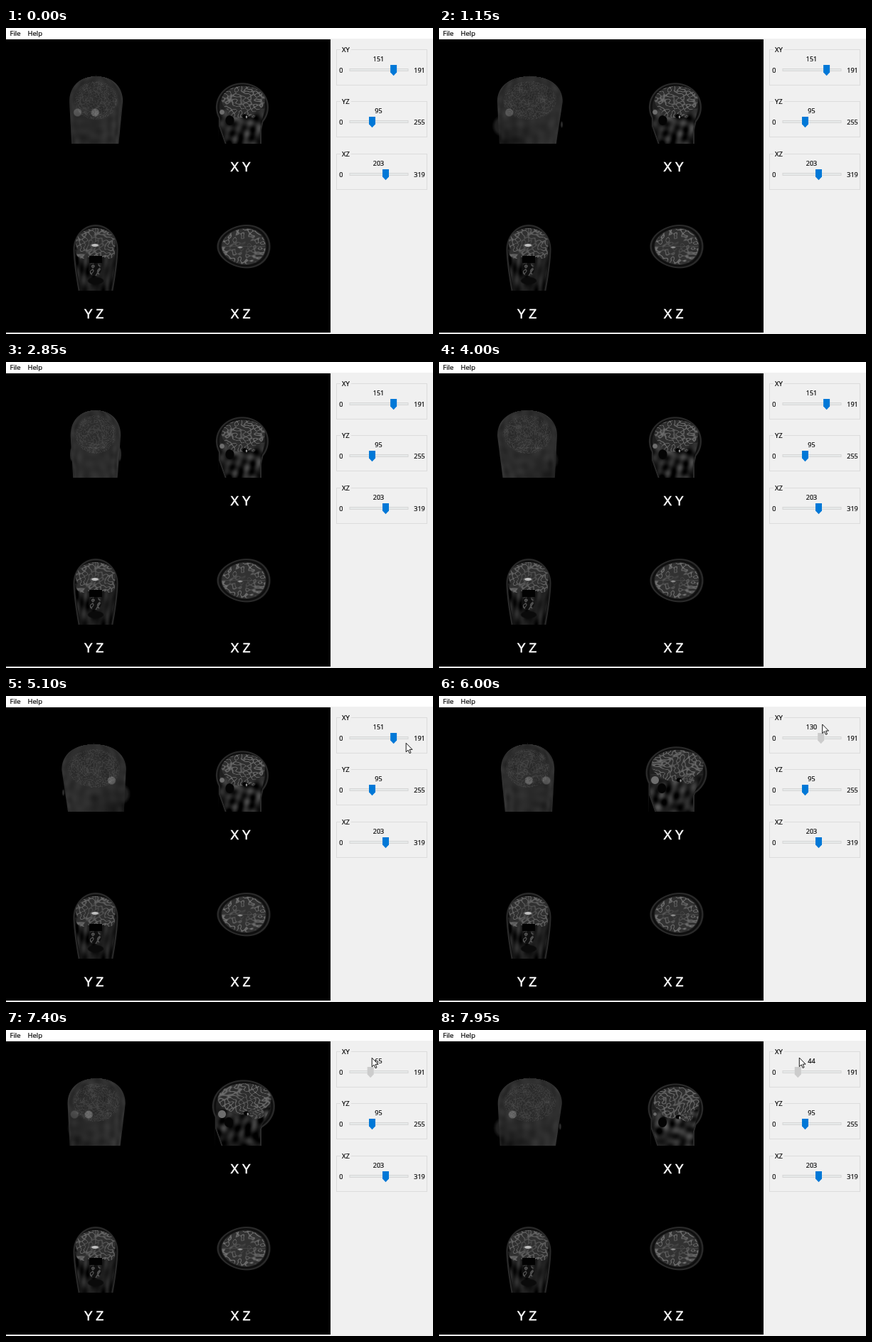
Recreate the animation shown at these times as an HTML page with a canvas. Size 600 by 431 pixels, loop 8000 ms.

```html
<!DOCTYPE html>
<html lang="en">
<head>
<meta charset="utf-8">
<title>Slice viewer</title>
<style>
  html, body { margin: 0; width: 100%; height: 100%; overflow: hidden; background: #f0f0f0; }
  canvas, svg { position: absolute; left: 0; top: 0; display: block; }
  text { font-family: "Open Sans", "Noto Sans", sans-serif; font-size: 9px; fill: #000; stroke: #000; stroke-width: .2px; }
  .menu, .title { font-size: 9.5px; }
  .mid { text-anchor: middle; }
  .view { font: 18px "Liberation Sans", Arial, sans-serif; fill: #fff; stroke: #fff; stroke-width: .5px; text-anchor: middle; }
</style>
</head>
<body>
<canvas width="456" height="429"></canvas>
<svg width="600" height="431" viewBox="0 0 600 431">
  <rect width="600" height="16" fill="#f0f0f0"/>
  <rect width="600" height="15" fill="#fff"/>
  <text class="menu" x="5.5" y="11.3">File</text>
  <text class="menu" x="30.5" y="11.3">Help</text>
  <text class="view" x="329.5" y="202">X Y</text>
  <text class="view" x="123.5" y="409">Y Z</text>
  <text class="view" x="329.5" y="409">X Z</text>
  <g id="panel"></g>
  <path id="cursor" d="M0 0V12.6L2.9 9.8 4.9 14.4 6.8 13.6 4.9 9.1H8.8Z" fill="#fff" stroke="#000" stroke-width=".9"/>
</svg>
<script>
const LOOP = 8000, STEP = 50;
const ctx = document.querySelector('canvas').getContext('2d');
const panel = document.getElementById('panel');
const cursor = document.getElementById('cursor');

const clamp = (v, lo = 0, hi = 1) => Math.min(hi, Math.max(lo, v));
const mix = (a, b, k) => a + (b - a) * clamp(k);
const lay = (under, over, d) => mix(under, over, d + 0.5);
const oval = (x, y, cx, cy, rx, ry) =>
  (1 - Math.hypot((x - cx) / rx, (y - cy) / ry)) * Math.min(rx, ry);

function track(keys, t) {
  let i = 1;
  while (i < keys.length - 1 && t > keys[i][0]) i++;
  const [t0, a] = keys[i - 1], [t1, b] = keys[i];
  return mix(a, b, (t - t0) / (t1 - t0));
}

// Random field of plane waves; its zero lines look like cortical folds.
let seed = 11;
const random = () => (seed = (seed * 16807) % 2147483647) / 2147483647;
const waves = Array.from({ length: 14 }, () => {
  const z = random() * 2 - 1, turn = random() * 2 * Math.PI;
  const k = 2 * Math.PI / (8.5 + random() * 3), r = Math.sqrt(1 - z * z) * k;
  return [r * Math.cos(turn), r * Math.sin(turn), z * k, random() * 6.28];
});
const field = (x, y, z) =>
  waves.reduce((sum, w) => sum + Math.cos(w[0] * x + w[1] * y + w[2] * z + w[3]), 0) / 2.65;
const folds = (x, y, z) =>
  Math.max(0, 1 - Math.abs(field(x * 1.3, y * 1.3, z * 1.3)) * 1.25);

function paint(x0, y0, w, h, shade) {
  const image = ctx.createImageData(w, h);
  for (let i = 0; i < w * h; i++) {
    const g = shade(x0 + i % w + 0.5, y0 + Math.floor(i / w) + 0.5);
    image.data.set([g, g, g, 255], i * 4);
  }
  ctx.putImageData(image, x0, y0);
}

// Scalp, bone and the space under it, by depth below the skin.
const shell = d => lay(lay(lay(0, 42, d), 15, d - 2), 30, d - 4.5);

function coronal(x, y) {
  const cx = 126, side = Math.abs(x - cx), low = clamp((y - 312) / 57);
  const d = y < 312 ? oval(x, y, cx, 312, 31.5, 35) : 31.5 - 7 * low ** 1.5 - side;
  let v = shell(d);
  if (y > 312) v = lay(v, 27 + 12 * field(x * 1.2, y * 0.35, 9) - 12 * low, d - 3);
  const brain = Math.max(oval(x, y, cx, 303, 28, 21), oval(side, y, 18, 317, 9, 8));
  v = lay(v, 48 + 60 * folds(x, y, 4) * clamp(1.2 - brain / 22), brain);
  if (y < 301) v = lay(v, 100, Math.min(brain, 0.4 - side));
  v = lay(v, 190, oval(x, y, 125, 306, 5, 2));
  v = lay(v, 2, Math.min(9 - side, 5 - Math.abs(y - 326)));
  v = lay(v, 15 + 80 * folds(x, y, 22), oval(x, y, 125, 340, 9, 9));
  return lay(v, 10, oval(x, y, cx, 356, 11, 5));
}

function axial(x, y) {
  const dx = x - 334, dy = (y - 307.7) / (1 + 0.003 * dx);
  const d = oval(dx, dy, 0, 0, 37.5, 30.5);
  let v = shell(d);
  const brain = d - 5.5;
  v = lay(v, 50 + 68 * folds(x, y, 40) * clamp(1.25 - brain / 20), brain);
  v = lay(v, 85, Math.min(brain - 1, 0.2 - Math.abs(dy)));
  return lay(v, 140, oval(x, y, 329, 309, 4, 1.6) - 0.3);
}

function sagittal(value) {
  const s = Math.sqrt(1 - ((value - 95) / 92.5) ** 2), tall = s ** 0.45;
  const cx = 322 + 12.5 * s, rx = 46.5 * s, top = 163 - 95 * tall, cy = top + 38 * tall;
  const middle = clamp((s - 0.95) / 0.045), depth = value * 0.35;
  const eyeAt = value > 95 ? 132 : 66;
  const eye = 5.5 * Math.sqrt(Math.max(0, 1 - ((value - eyeAt) / 24) ** 2));
  const lobeSize = clamp(1.6 - Math.abs(value - 85) / 50, 0.1);
  return (x, y) => {
    const left = cx - rx + 4 + Math.max(0, y - 138) * 0.35;
    const right = mix(cx + rx - 3, 359, (y - cy) / 32);
    const skull = oval(x, y, cx, cy, rx, 38 * tall);
    const body = Math.min(x - left, right - x, y - cy);
    const nose = oval(x, y, cx - rx + 4, 130, 6 * middle + 0.1, 7);
    let v = shell(Math.max(skull, body, nose));
    if (y > cy) v = lay(v, 34 + 16 * field(x * 0.8, y * 0.6, depth) - (y - cy) * 0.2, body - 2);
    v = lay(v, 4, oval(x, y, cx - 22 * s, 130, 6 + 4 * middle, 7));
    const bands = 20 + 45 * Math.max(0, Math.sin(y * 0.85 + x * 0.08));
    v = lay(v, mix(v, bands, middle), oval(x, y, cx - 23, 132, 17, 11));

    const brain = Math.max(oval(x, y, cx + 1.5, top + 27 * tall, rx - 6.5, 22 * tall),
      oval(x, y, cx - 2, top + 42, 17 * (1 - middle) + 0.1, 7));
    v = lay(v, 46 + 66 * folds(x, y, depth) * clamp(1.35 - brain / 28), brain);
    const lobe = oval(x, y, cx + 19 * s, top + 47, 11 * lobeSize, 8 * lobeSize);
    v = lay(v, 50 + 45 * folds(x * 1.4, y * 1.4, depth), lobe);

    const arch = oval(x, y, cx - 3, top + 38, 19, 14);
    if (y < top + 39) {
      v = lay(v, mix(v, 115, middle), 1 - Math.abs(arch));
      v = lay(v, mix(v, 45, middle), 1.5 - Math.abs(arch - 3));
      v = lay(v, mix(v, 115, middle), 1 - Math.abs(arch - 6));
    }
    v = lay(v, mix(v, 75, middle), oval(x, y, cx + 2, top + 53, 5, 13));
    v = lay(v, mix(v, 130, middle), oval(x, y, cx + 8, top + 52, 1.5, 9));
    v = lay(v, mix(2, v, middle), oval(x, y, cx + 4, top + 47, 4, 3));
    v = lay(v, mix(150, v, middle), oval(x, y, cx + 6, top + 48, 1.2, 1.8));
    return eye > 0.5 ? lay(v, 110, oval(x, y, 303.5, 118.5, eye, eye)) : v;
  };
}

function head(angle) {
  const c = Math.cos(angle), s = Math.sin(angle), axis = 125.6;
  const place = (px, pz) => [axis + px * c - pz * s, pz * c + px * s];
  const eyes = [place(-13.8, 28), place(13.8, 28)];
  const ears = [place(-34, -3), place(34, -3)];
  const [noseX] = place(0, 37), [napeX] = place(0, -47);
  return (x, y) => {
    const up = clamp((104 - y) / 36), q = Math.max(0, (y - 104) / 59);
    const k = (1 - up ** 2.2) ** (1 / 2.2);
    const dx = x - axis - (2.2 - 3 * q) * s;
    const half = Math.hypot((35 * k - 4 * q) * c, (46 * k - 6 * q) * s);
    const d = half - Math.abs(dx);
    let v = 0;
    for (const [ex] of ears) v = lay(v, 42, oval(x, y, ex, 130, 2 + 2 * Math.abs(s), 9));
    v = lay(v, 32, oval(x, y, noseX, 138, 12, 13) / 5);
    v = lay(v, 42, oval(x, y, napeX, 136, 1.5, 4));
    if (d > -1) {
      const depth = Math.hypot(35 * s, 46 * c) * Math.sqrt(Math.max(0, 1 - (dx / half) ** 2));
      const grain = field((dx * c + depth * s) * 0.6, y * 0.6, (depth * c - dx * s) * 0.6);
      const chin = clamp((y - 130) / 30) * clamp(0.4 - dx * s / 40) * 22 * Math.abs(s);
      v = lay(v, 45 + 3 * grain + 4 * clamp(1 - d / 4) - chin, d);
    }
    const e = 1 - ((y - 102) / 27) ** 2;
    if (e > 0) {
      const r = Math.sqrt(e), wide = r * Math.hypot(28 * c, 37 * s);
      const near = r * Math.hypot(28 * s, 37 * c) * Math.sqrt(Math.max(0, 1 - (dx / wide) ** 2));
      const lines = folds((dx * c + near * s) * 1.3, y * 1.3, (near * c - dx * s) * 1.3);
      v = lay(v, v + 2 + 20 * lines, (wide - Math.abs(dx)) / 3);
    }
    if (c < 0) v = lay(v, v + 14, Math.min(0.5 - Math.abs(y - 121), 14 - Math.abs(dx + 8 * s)));
    for (const [ex, depth] of eyes) {
      const shown = clamp(0.2 + depth / 25);
      v = lay(v, v + 45 * shown, oval(x, y, ex, 119, 5.5, 5.5) / 1.5);
    }
    return v;
  };
}

function slider(name, max, value, y) {
  panel.insertAdjacentHTML('beforeend', `<g transform="translate(0 ${y})">
    <rect x="464.5" y="0" width="127" height="50" fill="none" stroke="#dcdcdc"/>
    <rect x="470" y="-5" width="15" height="10" fill="#f0f0f0"/>
    <text class="title" x="472" y="3.2">${name}</text>
    <text class="mid value" x="523.5" y="16.5">${value}</text>
    <text x="468.3" y="32">0</text>
    <text class="mid" x="581" y="32">${max}</text>
    <rect x="483" y="27" width="82" height="3" fill="#e7eaea" stroke="#d6d6d6"/>
    <path class="thumb" d="M-4.5 21.5H4.5V32L0 36.7L-4.5 32Z"/></g>`);
  const group = panel.lastElementChild;
  const label = group.querySelector('.value'), thumb = group.querySelector('.thumb');
  return (v, color) => {
    const x = 487.7 + v / max * 72;
    label.textContent = Math.round(v);
    thumb.setAttribute('transform', `translate(${x} 0)`);
    thumb.setAttribute('fill', color);
    return x;
  };
}

const BLUE = '#0078d7';
const setXY = slider('XY', 191, 151, 30.5);
slider('YZ', 255, 95, 103.5)(95, BLUE);
slider('XZ', 319, 203, 177.5)(203, BLUE);

const VALUE = [[5550, 151], [6000, 130], [6750, 90], [7950, 44]];
const ENTER_X = [[4850, 601], [5200, 546.6]];
const POINTER_Y = [[4850, 92], [5200, 56], [5550, 54], [5900, 40], [7950, 39]];

ctx.fillRect(0, 0, 456, 429);
paint(92, 274, 68, 96, coronal);
paint(293, 274, 82, 68, axial);

let shownTime = -1, shownValue = -1;
function draw(t) {
  paint(74, 66, 104, 97, head((27 + 0.0509 * t) * Math.PI / 180));
  const value = Math.round(track(VALUE, t));
  if (value !== shownValue) paint(282, 66, 104, 97, sagittal(shownValue = value));
  const thumbX = setXY(value, t >= 5500 ? '#cccccc' : t >= 5200 ? '#171717' : BLUE);
  const x = t < 5200 ? track(ENTER_X, t) : thumbX + 2;
  cursor.setAttribute('transform', `translate(${x} ${track(POINTER_Y, t)})`);
  cursor.style.display = t < 4850 ? 'none' : '';
}

const start = performance.now();
function tick() {
  const t = Math.floor((performance.now() - start) % LOOP / STEP) * STEP;
  if (t !== shownTime) draw(shownTime = t);
  requestAnimationFrame(tick);
}
tick();
</script>
</body>
</html>
```
